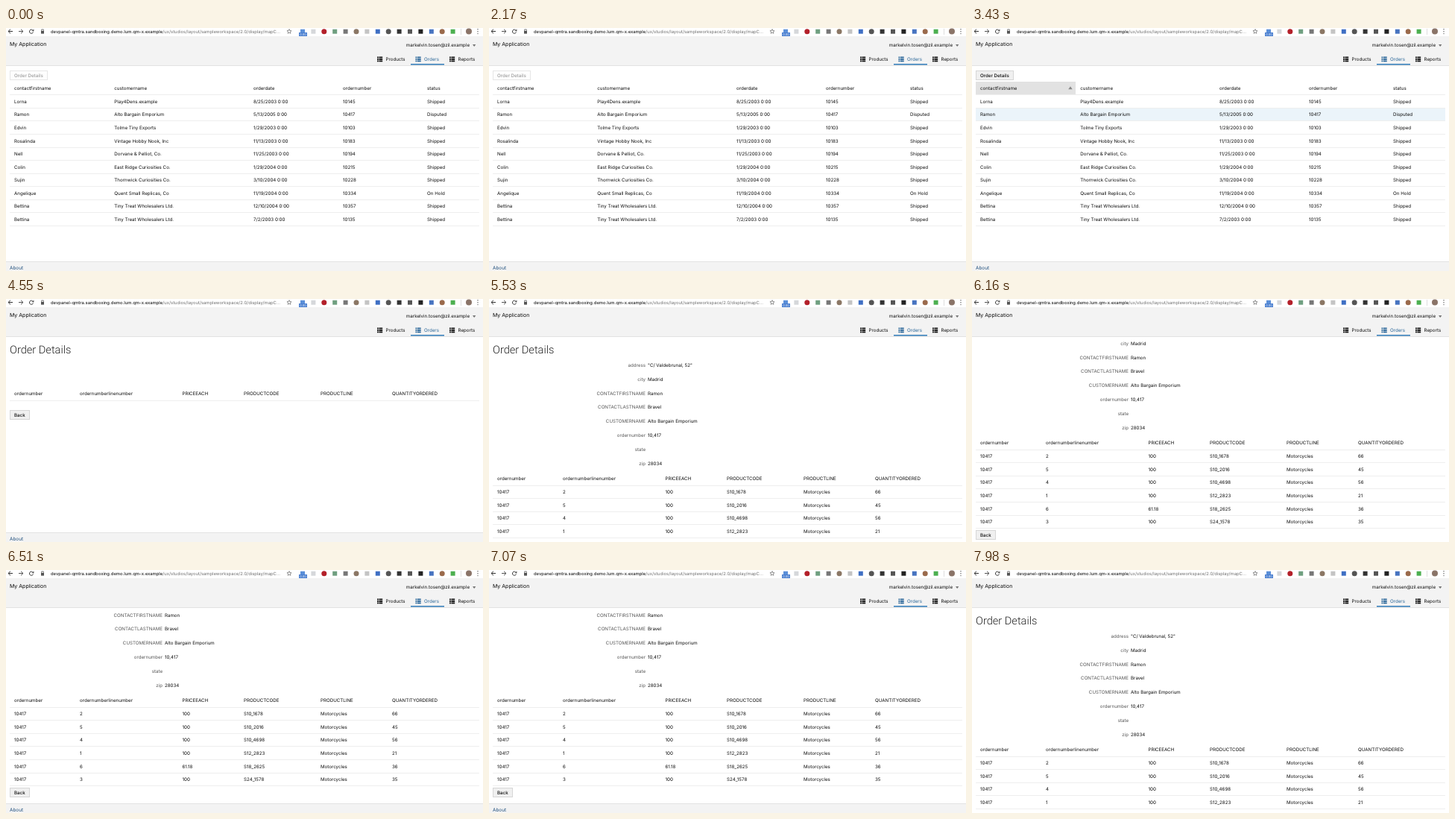
Recreate the animation shown at these times as an HTML page with a canvas. Size 640 by 326 pixels, loop 8 s.

```html
<!DOCTYPE html>
<html lang="en">
<head>
<meta charset="utf-8">
<title>Order browser</title>
<style>
  html, body { margin: 0; width: 100%; height: 100%; overflow: hidden; background: #fff; }
  canvas { display: block; }
</style>
</head>
<body>
<canvas id="stage" width="640" height="326"></canvas>
<script>
const ctx = document.getElementById('stage').getContext('2d');
ctx.textRendering = 'geometricPrecision';

const LOOP = 8000, SELECT = 3080, HOVER = 3360, HOVER_END = 3570, DETAILS = 4270, LOADED = 4760;
const ROW = 17.57, FIELD = 18.86, MAX_SCROLL = 66;
const INK = '#0c0c0c', BLUE = '#2b6799', LINE = '#eeeeee', PANEL = '#f3f3f3', EDGE = '#e2e2e2';

const ORDERS = {
  xs: [11, 145.3, 332, 452, 565],
  head: ['contactfirstname', 'customername', 'orderdate', 'ordernumber', 'status'],
  rows: [
    ['Lorna', 'Play4Dens.example', '8/25/2003 0:00', '10145', 'Shipped'],
    ['Ramon', 'Alto Bargain Emporium', '5/13/2005 0:00', '10417', 'Disputed'],
    ['Edvin', 'Tolme Tiny Exports', '1/29/2003 0:00', '10103', 'Shipped'],
    ['Rosalinda', 'Vintage Hobby Nook, Inc', '11/13/2003 0:00', '10183', 'Shipped'],
    ['Nell', 'Dorvane & Pelliot, Co.', '11/25/2003 0:00', '10194', 'Shipped'],
    ['Colin', 'East Ridge Curiosities Co.', '1/29/2004 0:00', '10215', 'Shipped'],
    ['Sujin', 'Thornwick Curiosities Co.', '3/10/2004 0:00', '10228', 'Shipped'],
    ['Angelique', 'Quent Small Replicas, Co', '11/19/2004 0:00', '10334', 'On Hold'],
    ['Bettina', 'Tiny Treat Wholesalers Ltd.', '12/10/2004 0:00', '10357', 'Shipped'],
    ['Bettina', 'Tiny Treat Wholesalers Ltd.', '7/2/2003 0:00', '10135', 'Shipped']
  ]
};
const LINES = {
  xs: [11, 99, 236.5, 319, 422, 518],
  head: ['ordernumber', 'ordernumberlinenumber', 'PRICEEACH', 'PRODUCTCODE', 'PRODUCTLINE', 'QUANTITYORDERED'],
  rows: [
    ['2', '100', 'S10_1678', '66'], ['5', '100', 'S10_2016', '45'], ['4', '100', 'S10_4698', '56'],
    ['1', '100', 'S12_2823', '21'], ['6', '61.18', 'S18_2625', '36'], ['3', '100', 'S24_1578', '35']
  ].map(([n, price, code, qty]) => ['10417', n, price, code, 'Motorcycles', qty])
};
const FIELDS = [
  ['address', '"C/ Valdebrunal, 52"'], ['city', 'Madrid'], ['CONTACTFIRSTNAME', 'Ramon'],
  ['CONTACTLASTNAME', 'Bravel'], ['CUSTOMERNAME', 'Alto Bargain Emporium'],
  ['ordernumber', '10,417'], ['state', ''], ['zip', '28034']
];
// Extension buttons, every 14.4px: colour, then "o" for round.
const EXTENSIONS = ['#5b8fd8', '#d5d7da', '#b3202a o', '#6f9f80', '#777', '#8b7765 o', '#c4c4c4', '#3f6fc4',
  '#555 o', '#333', '#555', '#222', '#4773c0', '#9a6a4c o', '#4caf50'];

function rect(x, y, w, h, color) {
  ctx.fillStyle = color;
  ctx.fillRect(x, y, w, h);
}

function text(str, x, y, { size = 6.2, weight = 400, color = INK, align = 'left', family = 'Inter' } = {}) {
  ctx.font = `${weight} ${size}px ${family}, sans-serif`;
  ctx.fillStyle = color;
  ctx.textAlign = align;
  ctx.fillText(str, x, y + size * 0.37);
  return ctx.measureText(str).width;
}

function shape(points, color, filled) {
  ctx.beginPath();
  points.forEach(([x, y]) => ctx.lineTo(x, y));
  ctx.fillStyle = ctx.strokeStyle = color;
  filled ? ctx.fill() : ctx.stroke();
}

function disc(x, y, r, color) {
  ctx.beginPath();
  ctx.arc(x, y, r, 0, 7);
  ctx.fillStyle = color;
  ctx.fill();
}

function button(label, y, w, enabled = true) {
  rect(5, y, w, 13, enabled ? '#d6d6d6' : '#e6e6e6');
  rect(6, y + 1, w - 2, 11, enabled ? '#f0f0f0' : '#fdfdfd');
  text(label, 11, y + 6.7, { weight: 500, color: enabled ? INK : '#9c9c9c' });
}

function table({ xs, head, rows }, y) {
  const cells = (row, cy) => row.forEach((s, i) => text(s, xs[i], cy));
  cells(head, y);
  rect(5, Math.round(y + 8.5), 630, 1, LINE);
  rows.forEach((row, i) => {
    const cy = y + 18 + i * ROW;
    cells(row, cy);
    rect(5, Math.round(cy + 8.3), 630, 1, LINE);
  });
}

function footer(y) {
  rect(0, y, 640, 40, PANEL);
  rect(0, y, 640, 1, EDGE);
  text('About', 5, y + 8.8, { color: '#1f4f7d', size: 6.4 });
}

function toolbar() {
  rect(0, 0, 640, 11, '#fff');
  ctx.lineWidth = 1;
  [[6, -1, '#333'], [20, 1, '#555']].forEach(([x, d, color]) => {
    shape([[x - 3 * d, 4.5], [x + 3 * d, 4.5]], color);
    shape([[x, 1.7], [x + 3 * d, 4.5], [x, 7.3]], color);
  });
  ctx.beginPath();
  ctx.arc(34, 4.7, 2.6, 0.3, 5.5);
  ctx.strokeStyle = '#444';
  ctx.stroke();
  shape([[37.4, 1.4], [37.4, 4.2], [34.6, 4.2]], '#444', true);

  rect(47, 4, 4, 3.6, '#555');
  ctx.lineWidth = 0.7;
  ctx.strokeRect(47.8, 2, 2.4, 2.5);
  const host = text('devpanel-qmtra.sandboxing.demo.lum.qm-x.example', 60, 4.7, { size: 5.85, weight: 500, color: '#222' });
  text('/ux/studios/layout/sampleworkspace/2.0/display/mapC...', 60 + host, 4.7, { size: 5.85, color: '#707070' });

  const star = Array.from({ length: 11 }, (_, i) => {
    const r = i % 2 ? 1.4 : 3.2, a = i * Math.PI / 5;
    return [380 + r * Math.sin(a), 4.7 - r * Math.cos(a)];
  });
  shape(star, '#666');
  EXTENSIONS.forEach((item, i) => {
    const [color, round] = item.split(' '), x = 398 + i * 14.4;
    round ? disc(x, 4.7, 3.5, color) : rect(x - 3, 1.7, 6, 6, color);
  });
  rect(393, 6, 11, 5, '#4a7fd0');
  text('0.00', 398.5, 8.5, { size: 4, color: '#fff', align: 'center' });
  rect(610, 1, 1, 8, '#ddd');
  disc(621, 4.5, 4, '#8a7468');
  [1.8, 4.7, 7.6].forEach(y => disc(633, y, 0.7, '#555'));
}

function tab(label, x, active) {
  const color = active ? BLUE : INK;
  [38.5, 41, 43.5].forEach(y => {
    rect(x, y, 1.8, 1.8, color);
    rect(x + 2.4, y, 4.8, 1.8, color);
  });
  text(label, x + 11.5, 42, { color });
  if (active) rect(543, 48, 45, 1.5, '#2f7ab8');
}

function header() {
  rect(0, 11, 640, 40, PANEL);
  rect(0, 50, 640, 1, EDGE);
  text('My Application', 5, 21.7, { size: 7 });
  text('markelvin.tosen@zil.example', 622, 23, { align: 'right' });
  shape([[626, 22], [630.4, 22], [628.2, 25]], '#777', true);
  tab('Products', 498);
  tab('Orders', 549.5, true);
  tab('Reports', 595);
}

function ordersPage(t) {
  const selected = t >= SELECT;
  button('Order Details', 57, 51, selected);
  if (selected) rect(5, 108, 630, 17, '#ebf4fa');
  if (t >= HOVER && t < HOVER_END) {
    rect(5, 72, 134, 17, '#e2e2e2');
    shape([[129.3, 82.3], [134.7, 82.3], [132, 78.3]], '#888', true);
  }
  table(ORDERS, 80.5);
  footer(313);
}

function detailsPage(loaded, scroll) {
  text('Order Details', 5, 67.5 - scroll, { size: 14.6, weight: 300, family: 'Roboto', color: '#222' });
  if (!loaded) {
    table({ ...LINES, rows: [] }, 127);
    button('Back', 149, 27);
    footer(313);
    return;
  }
  FIELDS.forEach(([label, value], i) => {
    const y = 88.5 + i * FIELD - scroll;
    text(label, 210, y, { align: 'right', color: '#555' });
    text(value, 213, y);
  });
  table(LINES, 241 - scroll);
  button('Back', 358 - scroll, 27);
  footer(379 - scroll);
}

function smooth(t, from, to) {
  const p = Math.min(1, Math.max(0, (t - from) / (to - from)));
  return p * p * (3 - 2 * p);
}

function draw(now) {
  const t = now % LOOP;
  const scroll = Math.round(MAX_SCROLL * (smooth(t, 5530, 6490) - smooth(t, 7640, 7980)));
  rect(0, 0, 640, 326, '#fff');
  if (t < DETAILS) ordersPage(t);
  else detailsPage(t >= LOADED, scroll);
  header();
  toolbar();
  requestAnimationFrame(draw);
}
requestAnimationFrame(draw);
</script>
</body>
</html>
```
